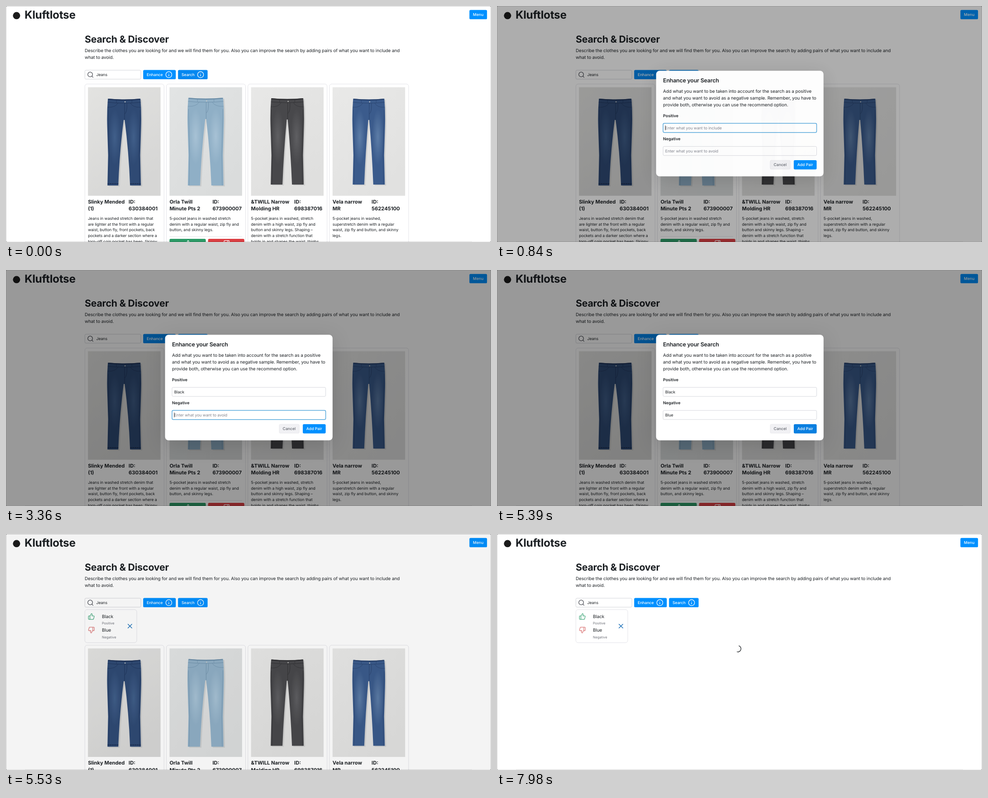
These frames come from a looping animation (1072 px wide and 522 px high, 8 s). An HTML page:

```html
<!DOCTYPE html>
<html lang="en">
<head>
<meta charset="utf-8">
<title>Search &amp; Discover</title>
<style>
html, body { margin: 0; width: 100%; height: 100%; overflow: hidden; background: #fff; }
svg { display: block; width: 100%; height: 100%; }
text { font-family: Inter, "Liberation Sans", sans-serif; fill: #1c2024; white-space: pre;
  text-rendering: geometricPrecision; font-optical-sizing: none; }
.brand { font-size: 24.3px; font-weight: 700; letter-spacing: -.01em; }
.h1 { font-size: 21.3px; font-weight: 700; letter-spacing: -.01em; }
.h2 { font-size: 12.4px; font-weight: 600; letter-spacing: -.016em; }
.name { font-size: 11.2px; font-weight: 700; }
.body { font-size: 9.9px; letter-spacing: -.008em; }
.small { font-size: 8.72px; letter-spacing: -.007em; }
.label { font-size: 8.9px; font-weight: 600; }
.button { font-size: 8.6px; font-weight: 500; }
.white { fill: #fff; }
.grey { fill: #60646c; }
.hint { fill: #80838d; }
.tiny { font-size: 7.5px; fill: #70737b; }
.box { fill: #fff; stroke: #dcdce2; stroke-width: .8; }
.icon { fill: none; stroke-width: 2; stroke-linecap: round; stroke-linejoin: round; }
#panel { filter: drop-shadow(0 8px 20px rgba(0, 0, 0, .14)); }
</style>
</head>
<body>
<svg id="stage" viewBox="0 0 1072 522" preserveAspectRatio="none"></svg>
<script>
const LOOP = 8000, STEP = 70;
const BLUE = '#0090ff', HOVER = '#0588f0', PRESSED = '#0a7fe0';
const SHIFT = 73.4, BLINK = 530;

const text = (x, y, str, cls, id = '') =>
  `<text id="${id}" x="${x}" y="${y}" class="${cls}">${str.replace(/&/g, '&amp;')}</text>`;
const lines = (x, y, gap, list, cls) => list.map((s, i) => text(x, y + i * gap, s, cls)).join('');
const rect = (x, y, w, h, r, attrs) =>
  `<rect x="${x}" y="${y}" width="${w}" height="${h}" rx="${r}" ${attrs}/>`;
const icon = (x, y, color, shape) =>
  `<g class="icon" stroke="${color}" transform="translate(${x} ${y}) scale(.64)">${shape}</g>`;
const button = (id, x, y, w, label) =>
  rect(x, y, w, 20.5, 2.6, `id="${id}" fill="${BLUE}"`) + text(x + 7.8, y + 13.4, label, 'button white');

const thumb = `<path d="M7 10v12M15 5.88 14 10h5.83a2 2 0 0 1 1.92 2.56l-2.33 8A2 2 0 0 1 17.5 22H4
  a2 2 0 0 1-2-2v-8a2 2 0 0 1 2-2h2.76a2 2 0 0 0 1.79-1.11L12 2a3.13 3.13 0 0 1 3 3.88Z"/>`;
const thumbDown = `<g transform="rotate(180 12 12)">${thumb}</g>`;
const info = '<circle cx="12" cy="12" r="10.4"/><path d="M12 16.5V11.5M12 7.7v.01"/>';
const lens = '<circle cx="11" cy="11" r="8.2"/><path d="m21 21-4.2-4.2"/>';

const products = [
  { name: ['Slinky Mended', '(1)'], id: '630384001', idX: 271, photo: ['#e3e3e1', '#d6d6d5'],
    top: 25, bottom: 217, hip: 38, gap: 13, cloth: '#2f4a74', light: '#45648f', dark: '#1d3054', hem: true,
    about: ['Jeans in washed stretch denim that', 'are lighter at the front with a regular',
      'waist, button fly, front pockets, back', 'pockets and a darker section where a',
      'torn-off coin pocket has been. Skinny'] },
  { name: ['Orla Twill', 'Minute Pts 2'], id: '673900007', idX: 456.4, photo: ['#e2e4e4', '#dadcdc'],
    top: 23, bottom: 217, hip: 40.5, gap: 12.5, cloth: '#8fafc6', light: '#adc6d8', dark: '#6789a3',
    about: ['5-pocket jeans in washed stretch', 'denim with a regular waist, zip fly and',
      'button, and skinny legs.'] },
  { name: ['&TWILL Narrow', 'Molding HR'], id: '698387016', idX: 637, photo: ['#e8e8e7', '#dfdfde'],
    top: 24, bottom: 215, hip: 37.5, gap: 10.5, cloth: '#48484b', light: '#656568', dark: '#2c2c2f',
    about: ['5-pocket jeans in washed, stretch', 'denim with a high waist, zip fly and',
      'button and skinny legs. Shaping –', 'denim with a stretch function that',
      'holds in and shapes the waist, thighs'] },
  { name: ['Vela narrow', 'MR'], id: '562245100', idX: 808, photo: ['#e9e9e8', '#e1e1e0'],
    top: 25, bottom: 215, hip: 36.5, gap: 10, cloth: '#3b5b8c', light: '#6585ad', dark: '#263f68',
    about: ['5-pocket jeans in washed,', 'superstretch denim with a regular',
      'waist, zip fly and button, and skinny', 'legs.'] },
];

function jeans({ top, bottom, hip, gap, cloth, dark, hem }, i) {
  const crotch = top + 47;
  const shape = `M${2 - hip} ${top}Q0 ${top + 3} ${hip - 2} ${top}
    Q${hip + .5} ${top + 30} ${hip - .5} ${top + 62}L${hip - 2.5} 150L${hip - 1} ${bottom}
    H${gap}Q${gap - 3} 140 1 ${crotch}H-1Q${3 - gap} 140 ${-gap} ${bottom}H${1 - hip}
    L${2.5 - hip} 150L${.5 - hip} ${top + 62}Q${-hip - .5} ${top + 30} ${2 - hip} ${top}Z`;
  const side = s => `<g transform="scale(${s} 1)">
    <ellipse cx="${hip * .55}" cy="${top + 85}" rx="${hip * .36}" ry="62" fill="url(#fade${i})"/>
    <path d="M${hip * .35} ${top + 9}Q${hip * .5} ${top + 20} ${hip - 1} ${top + 19}
      M${hip * .45} ${top + 2}v7M${hip - 2.5} ${top + 25}L${hip - 5} 150L${hip - 4} ${bottom}"
      fill="none" stroke="${dark}" stroke-width=".8" opacity=".75"/>
    ${hem ? `<path d="M${gap} ${bottom - 4}H${hip - 1.5}" stroke="${dark}" stroke-width="2" stroke-dasharray="4 1"/>` : ''}</g>`;
  return `<path d="${shape}" transform="translate(3 2)" opacity=".08"/>
    <path d="${shape}" fill="${cloth}"/>${side(1)}${side(-1)}
    <path d="M${3 - hip} ${top + 1}Q0 ${top + 5} ${hip - 3} ${top + 1}" stroke="${dark}" stroke-width="2" fill="none"/>
    <path d="M${1.5 - hip} ${top + 8}Q0 ${top + 12} ${hip - 1.5} ${top + 8}M1 ${top + 10}V${crotch}M6 ${top + 10}Q7 ${top + 30} 1 ${top + 34}"
      stroke="${dark}" stroke-width=".9" fill="none" opacity=".8"/>
    <circle cx="2" cy="${top + 7}" r="1.2" fill="#c9c9c4"/>`;
}

function card(p, i) {
  const x = 174 + i * 180.2, left = x + 7.2, end = 472.7 + p.about.length * 12.8;
  return `<linearGradient id="photo${i}" x2=".6" y2="1"><stop stop-color="${p.photo[0]}"/>
      <stop offset="1" stop-color="${p.photo[1]}"/></linearGradient>
    <radialGradient id="fade${i}"><stop stop-color="${p.light}" stop-opacity=".8"/>
      <stop offset="1" stop-color="${p.light}" stop-opacity="0"/></radialGradient>
    ${rect(x + .3, 172.6, 175, 420, 5, 'class="box"')}
    ${rect(left, 179.7, 160.4, 240, 0, `fill="url(#photo${i})"`)}
    <g transform="translate(${left + 80} 180)">${jeans(p, i)}</g>
    ${lines(left, 437, 15.3, p.name, 'name')}${lines(p.idX, 437, 15.3, ['ID:', p.id], 'name')}
    ${lines(left, 472.7, 12.8, p.about, 'small')}
    <path d="M${left} ${end - 1.1}h160.4" stroke="#dcdce2" stroke-width=".8"/>
    ${rect(left, end + 4, 80.2, 20.3, 2.6, 'fill="#2b9a66"')}${rect(left + 85.2, end + 4, 80.2, 20.3, 2.6, 'fill="#dc3e42"')}
    ${icon(left + 33, end + 6.4, '#fff', thumb)}${icon(left + 118, end + 6.4, '#fff', thumbDown)}`;
}

const fields = [
  { y: 259.5, word: 'Black', hint: 'Enter what you want to include', keys: [1820, 2100, 2240, 2730, 2800], from: 730, to: 3360 },
  { y: 310.6, word: 'Blue', hint: 'Enter what you want to avoid', keys: [3780, 3990, 4200, 4340], from: 3360, to: 5390 },
];

const stage = document.getElementById('stage');
stage.innerHTML = `
  <circle cx="23.3" cy="21.3" r="8" fill="#1b1b1b"/>
  ${text(41, 28, 'Kluftlotse', 'brand')}${button('menu', 1024.3, 8.8, 38.9, 'Menu')}
  ${text(174, 81, 'Search & Discover', 'h1')}
  ${lines(174, 101.8, 15.3, ['Describe the clothes you are looking for and we will find them for you. Also you can improve the search by adding pairs of what you want to include and', 'what to avoid.'], 'body')}
  ${rect(174.3, 142, 123.8, 19.8, 2.6, 'class="box" style="stroke:#c8c9d0"')}
  ${icon(179, 144.4, '#4a4d55', lens)}${text(199.5, 155, 'Jeans', 'small')}
  ${button('enhance', 303.2, 141.6, 72.1, 'Enhance')}${icon(352.2, 144.2, '#fff', info)}
  ${button('search', 380.2, 141.6, 65.4, 'Search')}${icon(422.4, 144.2, '#fff', info)}
  <g id="pair">${rect(174.3, 167.2, 114.7, 73.2, 5, 'class="box"')}
    ${icon(181, 174.8, '#46a97e', thumb)}${icon(181, 204.8, '#dc7c7c', thumbDown)}
    ${text(212, 185.7, 'Black', 'body')}${text(212, 200, 'Positive', 'tiny')}
    ${text(212, 216.4, 'Blue', 'body')}${text(212, 230.8, 'Negative', 'tiny')}
    <path d="m269.6 199.5 8.6 8.6m0-8.6-8.6 8.6" stroke="#1a6fb8" stroke-width="1.4" stroke-linecap="round"/></g>
  <g id="results">${products.map(card).join('')}</g>
  <path id="spinner" d="M0-7.05A7.05 7.05 0 0 1 0 7.05" fill="none" stroke="#1c2024" stroke-width="1.3"/>
  <path d="M42 521.2H1030" stroke="#000" opacity=".09"/>
  <rect id="overlay" width="1072" height="522"/>
  <g id="dialog">${rect(351.6, 143.2, 370.2, 233.6, 7.7, 'id="panel" fill="#fff"')}
    ${text(367, 168.5, 'Enhance your Search', 'h2')}
    ${lines(367, 191.5, 15.35, ['Add what you want to be taken into account for the search as a positive', 'and what you want to avoid as a negative sample. Remember, you have to', 'provide both, otherwise you can use the recommend option.'], 'body')}
    ${text(367, 245.8, 'Positive', 'label')}${text(367, 296.9, 'Negative', 'label')}
    ${fields.map((f, i) => rect(367, f.y, 339.6, 20.1, 2.6, `id="field${i}" fill="#fff"`) + text(371.7, f.y + 13.1, '', '', 'value' + i)).join('')}
    <path id="caret" d="M.3 0v10.4" stroke="#111" stroke-width=".9"/>
    ${rect(603.9, 341.2, 44.3, 19.8, 2.6, 'fill="#f1f1f4" stroke="#e4e4e9" stroke-width=".7"')}${text(611.6, 354.3, 'Cancel', 'button grey')}
    ${button('add', 656, 340.9, 50.6, 'Add Pair')}</g>
  <path d="M0 0H1072V522H0ZM3 .4Q.4 .4 .4 3V519Q.4 521.8 3 521.8H1069Q1071.6 521.8 1071.6 519V3Q1071.6 .4 1069 .4Z" fill="#666" fill-rule="evenodd" opacity=".6"/>`;

const el = {};
stage.querySelectorAll('[id]').forEach(node => { if (node.id) el[node.id] = node; });
const set = (id, name, value) => el[id].setAttribute(name, value);
const show = (id, on) => set(id, 'display', on ? 'inline' : 'none');
const progress = (t, start, length) => Math.min(1, Math.max(0, (t - start) / length));
const easeOut = (x, power) => 1 - (1 - x) ** power;

function drawFields(t) {
  show('caret', false);
  fields.forEach((f, i) => {
    const typed = f.keys.filter(k => k <= t);
    const focused = t >= f.from && t < f.to;
    const value = el['value' + i];
    value.textContent = typed.length ? f.word.slice(0, typed.length) : f.hint;
    value.setAttribute('class', typed.length ? 'small' : 'small hint');
    set('field' + i, 'stroke', focused ? '#58a9dc' : '#cdced6');
    set('field' + i, 'stroke-width', focused ? 1.5 : .8);
    const idle = t - (typed.at(-1) ?? f.from);
    if (focused && idle % (2 * BLINK) < BLINK) {
      const x = 371.7 + (typed.length ? value.getComputedTextLength() : 0);
      show('caret', true);
      set('caret', 'transform', `translate(${x} ${f.y + 4.8})`);
    }
  });
}

function draw(t) {
  const paired = t >= 5460, loading = t >= 6440;
  show('pair', paired);
  show('results', !loading);
  show('spinner', loading);
  set('results', 'transform', `translate(0 ${paired ? SHIFT : 0})`);
  set('spinner', 'transform', `translate(532.2 253.8) rotate(${18 + (t - 7980) * 360 / 450})`);

  set('enhance', 'fill', t < 210 || t >= 5460 ? BLUE : t >= 630 && t < 770 ? PRESSED : HOVER);
  set('search', 'fill', t >= 6370 && t < 6440 ? PRESSED : t < 210 || (t >= 6090 && t < 7210) ? HOVER : BLUE);
  set('add', 'fill', t >= 5390 ? PRESSED : t >= 5110 ? HOVER : BLUE);

  const dim = easeOut(progress(t, 730, 400), 5) * (1 - easeOut(progress(t, 5425, 200), 3));
  const visible = easeOut(progress(t, 730, 200), 5) * (1 - easeOut(progress(t, 5425, 100), 3));
  set('overlay', 'opacity', .4 * dim);
  set('dialog', 'opacity', visible);
  show('dialog', visible > 0);
  set('dialog', 'transform', `translate(536.7 ${260 + 3.2 * (1 - visible)}) scale(${.97 + .03 * visible}) translate(-536.7 -260)`);
  drawFields(t);
}

// The screen refreshes in steps of 70 ms.
function tick() {
  draw(Math.floor(performance.now() % LOOP / STEP) * STEP);
  requestAnimationFrame(tick);
}
tick();
</script>
</body>
</html>
```
